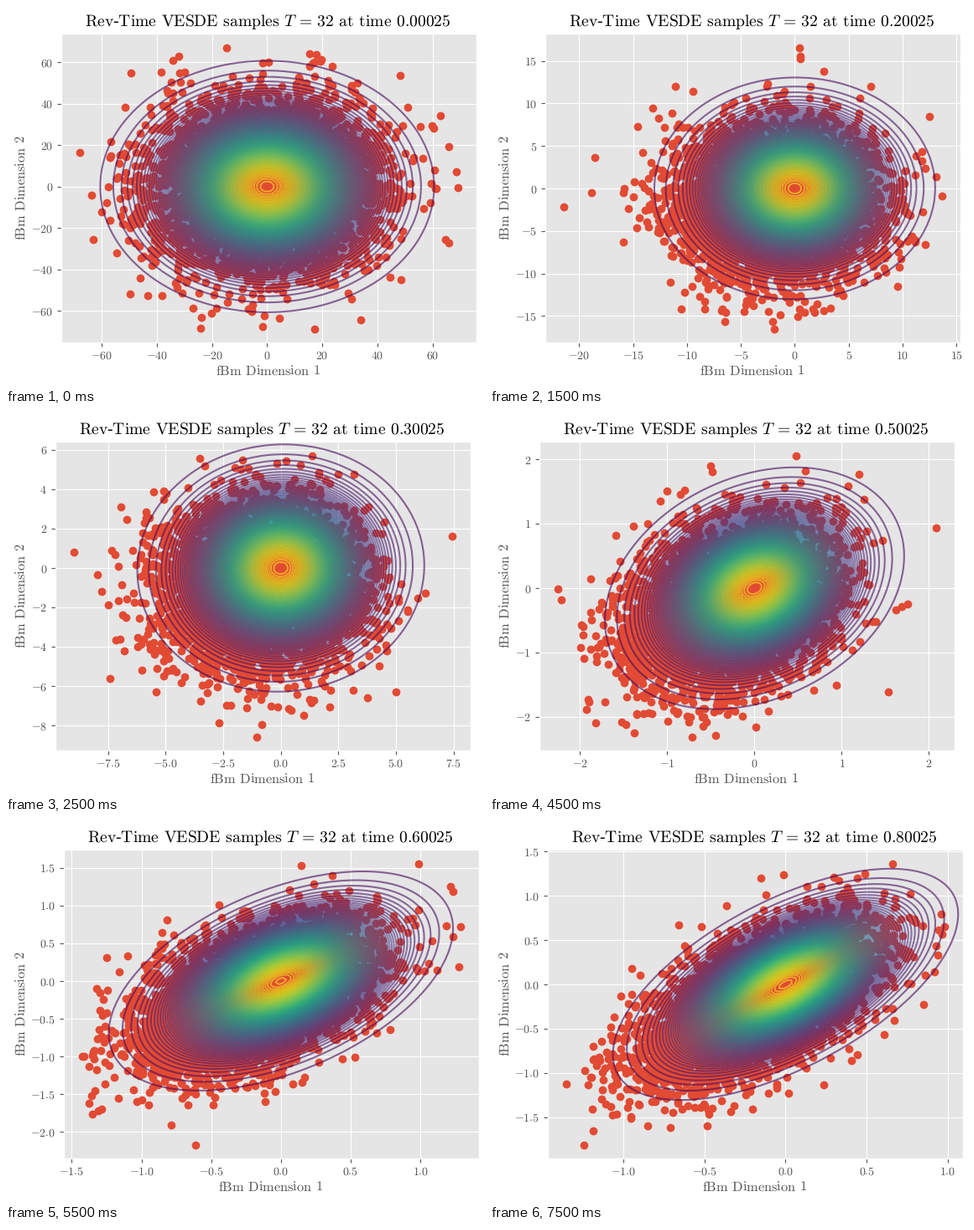
These frames come from a looping animation (570 px wide and 454 px high, 8000 ms). A matplotlib script:

```python
import matplotlib.pyplot as plt
import numpy as np
from matplotlib.animation import FuncAnimation
from matplotlib.ticker import FuncFormatter

W, H, DPI = 570, 454, 100
TOP, BOTTOM, AXES_WIDTH = 33, 402.3, 495.4
GREY = "#555555"
SPACE = r"\hspace{0.38}"

plt.rcParams.update({
    "font.family": "Liberation Serif",
    "font.size": 10,
    "mathtext.fontset": "cm",
    "text.hinting": "no_hinting",
    "axes.facecolor": "#E5E5E5",
    "axes.edgecolor": "white",
    "axes.linewidth": 1,
    "axes.grid": True,
    "axes.axisbelow": True,
    "grid.color": "white",
    "grid.linestyle": "-",
    "xtick.color": GREY,
    "ytick.color": GREY,
    "xtick.major.pad": 3.1,
})

# View edges (left, right, bottom, top) in standard deviations at key steps
KEY_STEPS = [0, 2, 3, 5, 6, 8]
KEY_VIEWS = np.array([
    (-3.747, 3.807, -3.771, 3.691),
    (-5.286, 3.510, -4.137, 4.149),
    (-4.731, 3.982, -4.446, 3.076),
    (-4.336, 4.030, -4.050, 3.654),
    (-3.795, 3.461, -4.876, 3.604),
    (-4.112, 3.069, -4.499, 3.477),
])


def roman(text):
    return r"\mathrm{" + text.replace(" ", SPACE) + "}"


def covariance(t):
    """Fractional Brownian motion (H = 0.3) plus the noise left at time t."""
    a, b = (1 / 32) ** 0.6, (2 / 32) ** 0.6
    noise = (0.01 * 2000 ** (1 - t)) ** 2
    return np.array([[a, b / 2], [b / 2, b]]) + noise * np.eye(2)


def view_at(step):
    """Lower and upper corner of the view in standard deviations."""
    left, right, bottom, top = (np.interp(step, KEY_STEPS, edge) for edge in KEY_VIEWS.T)
    return np.array([left, bottom]), np.array([right, top])


def samples(step, rho, low, high):
    """Drifting Gaussian cloud whose extremes lie a 5% margin inside the view."""
    rng = np.random.RandomState(40 + step)
    middle, half = (low + high) / 2, (high - low) / 2.2
    z = rng.standard_normal((5000, 2))
    z[:, 1] = rho * z[:, 0] + np.sqrt(1 - rho**2) * z[:, 1]
    z -= 0.48 * (1 - np.exp(-step / 1.2))
    z = z[(np.abs(z - middle) < half).all(axis=1)]

    extremes = []
    for axis in (0, 1):
        for sign in (-1, 1):
            point = np.empty(2)
            point[axis] = middle[axis] + sign * half[axis]
            point[1 - axis] = rho * point[axis] + 0.7 * rng.standard_normal()
            extremes.append(point)
    return np.vstack([z, extremes])


def density(cov):
    u = np.linspace(-3.3, 3.3, 100)
    sx, sy = np.sqrt(np.diag(cov))
    x, y = np.meshgrid(u * sx, u * sy)
    p = np.linalg.inv(cov)
    q = p[0, 0] * x**2 + 2 * p[0, 1] * x * y + p[1, 1] * y**2
    return x, y, np.exp(-q / 2) / (2 * np.pi * np.sqrt(np.linalg.det(cov)))


def label_ticks(axis):
    """Label the ticks and return the room the widest label takes."""
    ticks = axis.get_majorticklocs()
    gap = ticks[1] - ticks[0]
    decimals = 0 if abs(gap - round(gap)) < 1e-9 else 1
    axis.set_major_formatter(FuncFormatter(
        lambda v, _: f"${roman(f'{round(v, decimals) + 0.0:.{decimals}f}')}$"))
    low, high = axis.get_view_interval()
    biggest = max(abs(v) for v in ticks if low <= v <= high)
    return 7 * (len(str(int(biggest))) + decimals) + 3 * decimals


def add_label(x, y, text, **kw):
    fig.text(x / W, 1 - y / H, f"${roman(text)}$", fontsize=11.75, color=GREY,
             ha="center", va="baseline", rotation_mode="anchor", **kw)


fig = plt.figure(figsize=(W / DPI, H / DPI), dpi=DPI, facecolor="white")


def draw(i):
    step = (i + 1) // 2
    t = 0.00025 + 0.1 * step
    cov = covariance(t)
    sigma = np.sqrt(np.diag(cov))
    low, high = view_at(step)

    def place(left):
        return [left / W, 1 - BOTTOM / H, AXES_WIDTH / W, (BOTTOM - TOP) / H]

    fig.clear()
    ax = fig.add_axes(place(60))
    cloud = samples(step, cov[0, 1] / sigma.prod(), low, high) * sigma
    ax.scatter(*cloud.T, color="#E24A33")
    ax.contour(*density(cov), 100, cmap="viridis", alpha=0.6, linewidths=1.5)
    ax.set_xlim(low[0] * sigma[0], high[0] * sigma[0])
    ax.set_ylim(low[1] * sigma[1], high[1] * sigma[1])
    label_ticks(ax.xaxis)
    left = 51.7 + label_ticks(ax.yaxis)
    ax.set_position(place(left))

    title = (f"${roman('Rev')}$-${roman('Time VESDE samples ')}"
             rf"T\hspace{{0.16}}=\hspace{{0.16}}{roman(f'32 at time {t:.5f}')}$")
    ax.set_title(title, fontsize=14.1, color="black", x=0.497, y=1.0, pad=6)
    add_label(left + AXES_WIDTH / 2 - 0.7, 440.6, "fBm Dimension 1")
    add_label(22.4, 217.5, "fBm Dimension 2", rotation=90)
    return []


anim = FuncAnimation(fig, draw, frames=16, interval=500, init_func=lambda: [],
                     repeat=True, repeat_delay=0, blit=False)
plt.show()
```
